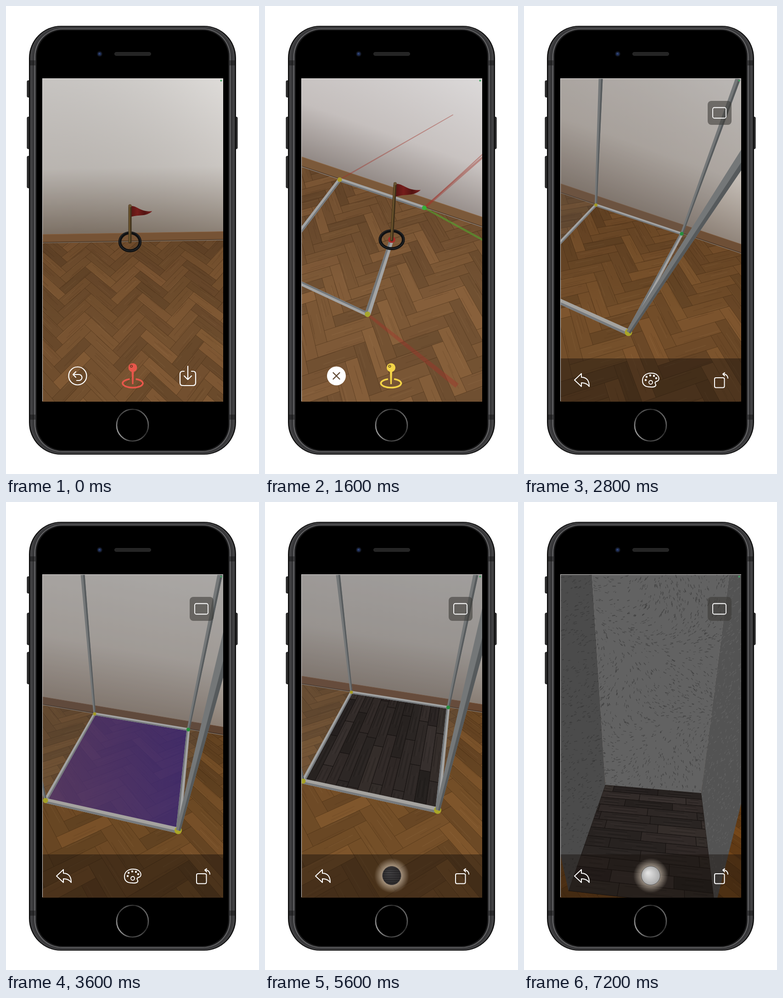
An HTML page with a canvas that plays this animation: 551 px wide and 1016 px high, repeating every 7.8 s.

```html
<!DOCTYPE html>
<html lang="en">
<head>
<meta charset="utf-8">
<title>Room scanner</title>
<style>
html, body { margin: 0; width: 100%; height: 100%; overflow: hidden; background: #fff; }
canvas { display: block; }
</style>
</head>
<body>
<canvas id="stage" width="551" height="1016"></canvas>
<script>
const c = document.getElementById('stage').getContext('2d');
const L = 79, T = 158, R = 473, B = 859;

// Camera poses. box: back-left, back-right, front-right, front-left on the floor.
// posts: x of the two back posts at the top, y of the front post at the right edge.
// flag: pole top, pole foot, ring radii. tilt: light from the right (1) or left (-1).
const poses = [
  { t: 0, box: [85, 515, 270, 512, 290, 745, 60, 750], posts: [167, 466, 335], flag: [270, 434, 270, 512, 22, 19.5],
    board: 19, tilt: 1, wood: '73502f', wall: ['d9d6d3', 'c9c4bf', '84776a'], skirt: '765335' },
  { t: 800, box: [248, 323, 461, 325, 510, 600, 238, 600], posts: [167, 466, 335], flag: [276, 404, 276, 508, 26, 22],
    board: 20, tilt: -1, wood: '816244', wall: ['c3c6d1', 'b6b8c2', 'a2a2a9'], skirt: '74543b' },
  { t: 2000, box: [120, 404, 290, 495, 80, 704, -99, 558], posts: [167, 466, 335], flag: [287, 377, 276, 507, 25, 18],
    board: 23, tilt: 1, wood: '77512e', wall: ['e4ded9', 'd3c9c0', '8d8076'], skirt: '7e5b3a' },
  { t: 3600, box: [193, 460, 397, 494, 375, 713, 86, 648], posts: [167, 466, 335], flag: [287, 377, 276, 507, 25, 18],
    board: 18, tilt: 0, wood: '6b4824', wall: ['c0bebb', 'b2aca6', '8a7d72'], skirt: '5e4331' },
  { t: 4400, box: [193, 410, 404, 444, 380, 667, 88, 602], posts: [167, 466, 310], flag: [287, 377, 276, 507, 25, 18],
    board: 18, tilt: 0, wood: '795328', wall: ['bbb9b7', 'b0aba7', '8e837a'], skirt: '6b4a35' },
  { t: 5600, box: [188, 413, 399, 446, 376, 669, 83, 606], posts: [159, 459, 285], flag: [287, 377, 276, 507, 25, 18],
    board: 18, tilt: 0, wood: '724d27', wall: ['b3b1af', 'a8a39e', '877c73'], skirt: '664631' },
  { t: 7200, box: [177, 614, 386, 632, 416, 880, 97, 844], posts: [148, 447, 655], flag: [287, 377, 276, 507, 25, 18],
    board: 18, tilt: 0, wood: '6e4318', wall: ['b3b1af', 'a8a39e', '877c73'], skirt: '664631' }
];

const hash = (a, b) => { const s = Math.sin(a * 12.9898 + b * 78.233) * 43758.5453; return s - Math.floor(s); };
const mix = (a, b, k) => a + (b - a) * k;
const mixAll = (a, b, k) => a.map((v, i) => mix(v, b[i], k));
const rgb = hex => [0, 2, 4].map(i => parseInt(hex.substr(i, 2), 16));
const css = (col, k = 1) => `rgb(${col.map(v => Math.round(v * k))})`;

function poseAt(t) {
  let i = 0;
  while (i < poses.length - 2 && poses[i + 1].t <= t) i++;
  const a = poses[i], b = poses[i + 1], k = Math.min(1, (t - a.t) / (b.t - a.t));
  const col = (x, y) => mixAll(rgb(x), rgb(y), k);
  return {
    box: mixAll(a.box, b.box, k), posts: mixAll(a.posts, b.posts, k), flag: mixAll(a.flag, b.flag, k),
    board: mix(a.board, b.board, k), tilt: mix(a.tilt, b.tilt, k),
    wood: col(a.wood, b.wood), skirt: col(a.skirt, b.skirt), wall: a.wall.map((w, j) => col(w, b.wall[j]))
  };
}

// Perspective map from the unit square to the four box corners.
function projector([x0, y0, x1, y1, x2, y2, x3, y3]) {
  const dx1 = x1 - x2, dx2 = x3 - x2, sx = x0 - x1 + x2 - x3;
  const dy1 = y1 - y2, dy2 = y3 - y2, sy = y0 - y1 + y2 - y3;
  const d = dx1 * dy2 - dx2 * dy1;
  const g = (sx * dy2 - dx2 * sy) / d, h = (dx1 * sy - sx * dy1) / d;
  return (u, v) => {
    const w = g * u + h * v + 1;
    return w < 0.08 ? null : [
      ((x1 - x0 + g * x1) * u + (x3 - x0 + h * x3) * v + x0) / w,
      ((y1 - y0 + g * y1) * u + (y3 - y0 + h * y3) * v + y0) / w];
  };
}

function trace(pts) {
  c.beginPath();
  pts.forEach(p => c.lineTo(p[0], p[1]));
  c.closePath();
}
function poly(pts, fill) { trace(pts); c.fillStyle = fill; c.fill(); }
function line(a, b, color, width = 1) {
  c.beginPath(); c.moveTo(a[0], a[1]); c.lineTo(b[0], b[1]);
  c.strokeStyle = color; c.lineWidth = width; c.stroke();
}
function oval(x, y, rx, ry, fill, stroke, width) {
  c.beginPath(); c.ellipse(x, y, rx, ry, 0, 0, 7);
  if (fill) { c.fillStyle = fill; c.fill(); }
  if (stroke) { c.strokeStyle = stroke; c.lineWidth = width; c.stroke(); }
}
function rounded(x, y, w, h, r, fill, stroke, width) {
  c.beginPath(); c.roundRect(x, y, w, h, r);
  if (fill) { c.fillStyle = fill; c.fill(); }
  if (stroke) { c.strokeStyle = stroke; c.lineWidth = width; c.stroke(); }
}
function icon(d, color = '#fff', width = 2.2) {
  c.strokeStyle = color; c.lineWidth = width; c.stroke(new Path2D(d));
}
function blend(x0, y0, x1, y1, colors, stops) {
  const g = c.createLinearGradient(x0, y0, x1, y1);
  colors.forEach((s, i) => g.addColorStop(stops ? stops[i] : i / (colors.length - 1), s));
  return g;
}
// Tapered strip from a to b; lo and hi choose the part of its width.
function strip(a, b, wa, wb, fill, lo = -0.5, hi = 0.5) {
  const dx = b[0] - a[0], dy = b[1] - a[1], n = Math.hypot(dx, dy) || 1;
  const at = (p, k) => [p[0] - dy / n * k, p[1] + dx / n * k];
  poly([at(a, wa * lo), at(b, wb * lo), at(b, wb * hi), at(a, wa * hi)], fill);
}
function tube(a, b, wa, wb = wa, light = '#a3a4a4', dark = '#73777a') {
  strip(a, b, wa, wb, light);
  strip(a, b, wa, wb, dark, 0.1, 0.5);
}

function parquet(map, wood) {
  const n = 4, across = 0.068, deep = 0.053;
  for (let m = -8; m < 10; m++) for (let k = -n * m - 6; k < 44 - n * m; k++) for (let up = 0; up < 2; up++) {
    const x = k + 2 * n * m, y = up ? k - 2 * n + 1 : k;
    const at = (i, j) => {
      const a = x + (up ? j : i), b = y + (up ? i : j);
      return map((a - b) * across, (a + b) * deep);
    };
    const pts = [at(0, 0), at(n, 0), at(n, 1), at(0, 1)];
    if (pts.includes(null)) continue;
    const xs = pts.map(p => p[0]), ys = pts.map(p => p[1]);
    if (Math.max(...xs) < L || Math.min(...xs) > R || Math.max(...ys) < T || Math.min(...ys) > B) continue;
    poly(pts, css(wood, 0.89 + 0.23 * hash(x + up * 31, y)));
    c.strokeStyle = 'rgba(40,22,8,.26)'; c.lineWidth = 0.9; c.stroke();
    for (let g = 1; g < 4; g++) {
      const j = hash(x + g, y + up * 9), i = hash(y, x + g) * 2;
      line(at(i, j), at(i + 1.8, j), g % 2 ? 'rgba(40,20,5,.1)' : 'rgba(255,220,170,.06)', 1.3);
    }
  }
}

function darkPlanks(map, turned) {
  const at = (a, b) => turned ? map(b, a) : map(a, b);
  const rows = 12;
  for (let r = 0; r < rows; r++) for (let i = -1; i < 3; i++) {
    const from = Math.max(0, i * 0.46 + hash(r, 4) * 0.46), to = Math.min(1, (i + 1) * 0.46 + hash(r, 4) * 0.46);
    if (to <= from) continue;
    const v0 = r / rows, v1 = (r + 1) / rows, k = 0.8 + 0.42 * hash(r, i);
    poly([at(from, v0), at(to, v0), at(to, v1), at(from, v1)], css([45, 39, 37], k));
    c.strokeStyle = '#161211'; c.lineWidth = 1; c.stroke();
    for (let g = 1; g < 5; g++) {
      const v = mix(v0, v1, g / 5), u = mix(from, to, hash(r + g, i) * 0.5);
      line(at(u, v), at(mix(u, to, 0.7), v), g % 2 ? 'rgba(0,0,0,.25)' : 'rgba(120,105,98,.13)');
    }
  }
}

function plaster(pts, fill, mark, count, angle) {
  c.save();
  poly(pts, fill); c.clip();
  const xs = pts.map(p => p[0]), x0 = Math.min(...xs), x1 = Math.max(...xs);
  c.lineCap = 'round';
  for (let i = 1; i <= count; i++) {
    const x = mix(x0, x1, hash(i, 1)), y = mix(T, B, hash(i, 2));
    const a = angle(x, y) + hash(i, 3) * 0.8, len = 1 + 5 * hash(i, 5) * (1.3 - (y - T) / 900);
    line([x, y], [x + len * Math.cos(a), y + len * Math.sin(a)], mark, 0.8 + hash(i, 6) * 1.2);
  }
  c.restore();
}

function flag([tx, ty, bx, by, rx, ry]) {
  oval(bx, by, rx, ry, null, '#0f1011', 6.5);
  oval(bx, by - 1, rx + 1, ry + 1, null, '#2b2e32', 1.2);
  const w = rx * 2.2, h = w / 2;
  c.beginPath();
  c.moveTo(tx + 2, ty);
  c.bezierCurveTo(tx + w * 0.35, ty, tx + w * 0.45, ty + h * 0.55, tx + w, ty + h * 0.48);
  c.bezierCurveTo(tx + w * 0.7, ty + h, tx + w * 0.45, ty + h * 0.75, tx + 1, ty + h);
  c.fillStyle = blend(tx, 0, tx + w, 0, ['#541412', '#761d1b', '#521311', '#7c2220']);
  c.fill();
  c.lineCap = 'round';
  line([tx, ty], [bx, by], '#3f301a', 7);
  line([tx - 1, ty], [bx - 1, by], '#6b532b', 3);
  oval(tx, ty, 3.5, 3, '#6a5535');
  c.lineCap = 'butt';
}

function joystick(x, color) {
  oval(x, 785, 9.5, 9.5, color);
  oval(x - 3, 782, 2.3, 2.3, null, 'rgba(70,45,25,.75)', 1.6);
  strip([x, 793], [x, 821], 5, 3, color);
  c.beginPath(); c.ellipse(x, 819, 22, 9.5, 0, -1.2, 4.34);
  c.strokeStyle = color; c.lineWidth = 3.6; c.stroke();
}

function scanControls(t) {
  c.lineCap = c.lineJoin = 'round';
  if (t < 400) {
    oval(156, 803, 19.5, 19.5, null, '#fff', 2.2);
    icon('M152 794L146 800L152 806M146 800H159A6.5 6.5 0 0 1 159 813H154');
    icon('M388 793H385Q379 793 379 799V818Q379 824 385 824H407Q413 824 413 818V799Q413 793 407 793H404M396 782V810M388 803L396 811L404 803');
  } else {
    oval(155.5, 803, 20.5, 20.5, '#fff');
    icon('M148.5 796L162.5 810M162.5 796L148.5 810', '#604832', 2.4);
  }
  joystick(t < 400 ? 276 : 274.5, t < 800 ? '#e7574a' : t < 2000 ? '#f4d548' : '#3c83f3');
}

function editControls(t) {
  c.fillStyle = 'rgba(24,17,12,.45)'; c.fillRect(L, 765, R - L, B - 765);
  rounded(400, 206, 52, 52, 8, 'rgba(60,57,54,.58)');
  rounded(411, 220.5, 29, 23, 3.5, null, '#fff', 1.8);
  c.lineCap = c.lineJoin = 'round';
  icon('M110 812L125 798V806C136 806 142 813 142 826C138 820 133 818 125 818V826Z', '#fff', 2);
  icon('M418 807H433Q436.5 807 436.5 810V825Q436.5 828.5 433 828.5H418Q415 828.5 415 825V810Q415 807 418 807ZM434 799Q443 799 444 808M437 796L433 799L437 803', '#fff', 2);
  if (t < 4400) {
    icon('M277 797C263 797 258 806 258 813C258 822 264 827 275 827C286 828 289 824 286 820C284 816 288 815 291 814C297 811 294 797 277 797Z', '#fff', 2);
    [[265, 812], [267, 805], [275, 802], [283, 803], [288, 808]].forEach(([x, y]) => oval(x, y, 2.2, 2.2, '#fff'));
    oval(276, 817, 4, 4, null, '#fff', 1.8);
    return;
  }
  const silver = t >= 6400;
  const glow = c.createRadialGradient(276, 811, 19, 276, 811, 38);
  glow.addColorStop(0, 'rgba(255,240,220,.55)'); glow.addColorStop(1, 'rgba(255,240,220,0)');
  oval(276, 811, 38, 38, glow);
  const disc = c.createRadialGradient(270, 805, 2, 276, 811, 22);
  disc.addColorStop(0, silver ? '#e2e2e2' : '#414042'); disc.addColorStop(1, silver ? '#a6a6a6' : '#2a2829');
  oval(276, 811, 20.5, 20.5, disc, silver ? '#555' : '#75695f', 1);
  if (silver) return;
  for (let y = 797; y < 829; y += 5) {
    const half = Math.sqrt(390 - (y - 811) ** 2);
    line([276 - half, y], [276 + half, y], '#1c1b1c');
  }
}

function scene(t) {
  const p = poseAt(t), map = projector(p.box);
  const [bl, br, fr, fl] = [0, 2, 4, 6].map(i => p.box.slice(i, i + 2));
  const slope = (br[1] - bl[1]) / (br[0] - bl[0]);
  const base = (x, up = 0) => [x, bl[1] + (x - bl[0]) * slope - up];
  const cursor = [p.flag[2], p.flag[3]];
  const rel = (a, x, y) => [a[0] + x, a[1] + y];

  c.fillStyle = css(p.wood); c.fillRect(L, T, R - L, B - T);
  parquet(map, p.wood);
  const mid = base(276), tall = mid[1] - 130;
  c.fillStyle = blend(0, mid[1], 0, mid[1] + 190, ['rgba(50,28,12,.18)', 'rgba(50,28,12,0)']);
  c.fillRect(L, T, R - L, B - T);

  const wall = [[L, T - 80], [R, T - 80], base(R), base(L)];
  poly(wall, blend(mid[0] + slope * tall, mid[1] - tall, mid[0], mid[1] - 15, p.wall.map(w => css(w)), [0, 0.6, 1]));
  const lean = 197 * Math.sign(p.tilt);
  c.globalAlpha = Math.abs(p.tilt);
  poly(wall, blend(276 - lean, T + 170, 276 + lean, T, ['rgba(0,0,0,.08)', 'rgba(255,255,255,.18)']));
  c.globalAlpha = 1;
  poly([base(L, p.board), base(R, p.board), base(R, 2), base(L, 2)], css(p.skirt));
  line(base(L, p.board), base(R, p.board), css(p.skirt, 1.15));
  line(base(L, 2), base(R, 2), css(p.skirt, 0.65), 1.5);

  if (t >= 2800) {
    const blTop = [p.posts[0], T], brTop = [p.posts[1], T], frEdge = [R, p.posts[2]];
    const left = [[L, T], blTop, bl, fl, rel(fl, -18, -79), [L, Math.min(fl[1], 765)]];
    const back = [blTop, brTop, br, bl];
    const right = [brTop, [R, T], frEdge, fr, br];
    if (t >= 4400) darkPlanks(map, t >= 5200 && t < 6000);
    else if (t >= 3200) poly([bl, br, fr, fl], blend(fl[0], 0, br[0], 0, ['rgba(80,52,116,.74)', 'rgba(54,36,128,.74)']));
    if (t >= 6400) {
      plaster(left, '#4b4b4b', 'rgba(35,35,35,.3)', 700, () => 2.3);
      plaster(back, '#626262', 'rgba(48,48,48,.45)', 2300, (x, y) => Math.sin(x / 75) + Math.cos(y / 62) * 1.2);
      plaster(right, '#535353', 'rgba(110,110,110,.4)', 900, (x, y) => 2 - (y - T) / 1400);
    } else {
      [left, back, right].forEach(w => poly(w, 'rgba(100,98,95,.24)'));
    }
  }

  if (t >= 400 && t < 2400) guides();
  if (t >= 2400 && t < 6400) frame();
  if (t < 2400) flag(p.flag);

  function guides() {
    const red = 'rgba(160,50,42,.42)', green = 'rgba(82,165,45,.6)';
    if (t >= 800 && t < 1600) {
      strip(rel(bl, 5, -165), rel(bl, -15, 536), 3, 8, red);
      strip(rel(br, -40, -167), rel(br, 12, 37), 3, 4, red);
      strip(rel(cursor, -197, 23), rel(cursor, 197, -22), 5, 5, green);
      strip(rel(cursor, 3, 10), rel(cursor, 44, 292), 4, 8, green);
    }
    if (t >= 1600) {
      strip(bl, rel(bl, 247, -141), 3, 1.6, red);
      strip(br, rel(br, 183, -168), 3, 2, red);
      strip(br, rel(br, 142, -123), 6, 4, red);
      strip(fr, rel(fr, 195, 155), 6, 11, red);
      strip(br, rel(br, 183, 100), 4, 5, green);
    }
    // Each side runs to the cursor until its end point is placed.
    if (t < 800) tube(cursor, br, 6);
    else tube(bl, br, 8);
    if (t >= 800) tube(t < 1200 ? cursor : fl, bl, 9, 8);
    if (t >= 1200) tube(t < 1600 ? cursor : fr, fl, 9);
    if (t >= 1600) tube(t < 2000 ? cursor : br, fr, 9, 13);
    oval(...bl, 5, 5, '#a99b2a');
    oval(...br, 5, 5, t < 2000 ? '#36b038' : '#b33a35');
    if (t >= 1200) oval(...fl, 6, 6, '#a7a62d');
    if (t >= 1600) oval(...fr, 6, 6, '#a7a62d');
    if (t >= 800 && t < 2000) oval(...cursor, 8, 7, '#a72b28');
  }

  function frame() {
    const grow = Math.min(1, (t - 2000) / 800);
    const post = (a, b, wa, wb) => tube(a, mixAll(a, b, grow), wa, mix(wa, wb, grow), '#747778', '#565a5c');
    post(bl, [p.posts[0], T], 5, 9);
    post(br, [p.posts[1], T], 6, 11);
    tube(bl, br, 6);
    tube(br, fr, 7, 10);
    tube(fl, bl, 8, 6);
    tube(fl, fr, 11, 13, '#a5a39f', '#777a7d');
    post(fl, rel(fl, -18, -79), 6, 8);
    oval(...bl, 3.5, 3.5, '#a39b25');
    oval(...br, 4, 4, '#278e3c');
    oval(...fl, 5.5, 5.5, '#a5a226');
    oval(...fr, 8, 8, '#aaa629');
    post(fr, [mix(fr[0], R, 1.3), mix(fr[1], p.posts[2], 1.3)], 10, 29);
  }
}

function phone() {
  c.fillStyle = '#fff'; c.fillRect(0, 0, 551, 1016);
  [[46, 162, 36], [46, 241, 69], [46, 326, 69], [496, 241, 69]].forEach(([x, y, h]) => rounded(x, y, 8, h, 2, '#2d2d2e', '#0c0c0c', 1));
  rounded(50, 43, 451, 931, 70, '#0d0d0d');
  rounded(52.5, 44.5, 446, 928, 68, '#414143');
  rounded(57, 46, 437, 925, 65, '#38383a');
  rounded(62, 49, 427, 919, 61, '#6c6c6e');
  rounded(64, 50.5, 423, 916, 59, '#1c1c1d');
  rounded(67, 53, 417, 911, 56, '#000');
  c.fillStyle = 'rgba(0,0,0,.35)';
  [118, 887].forEach(y => [52, 487].forEach(x => c.fillRect(x, y, 12, 11)));
  oval(204, 104, 6, 6, '#10131b');
  oval(204, 104, 3.8, 3.8, '#1f2f57');
  oval(203.5, 103.5, 1.3, 1.3, '#40568a');
  rounded(236.5, 100.5, 79, 7, 3.5, '#242424', '#2c2c2c', 1);
  oval(275.5, 910, 34.5, 34.5, '#000', blend(242, 925, 309, 892, ['#a2a2a2', '#3a3a3a', '#555', '#282828', '#777']), 2.6);
}

function draw(t) {
  c.lineCap = 'butt'; c.lineJoin = 'miter';
  phone();
  c.save();
  c.beginPath(); c.rect(L, T, R - L, B - T); c.clip();
  scene(t);
  if (t < 2800) scanControls(t); else editControls(t);
  oval(468.5, 162, 2, 2, '#44a765');
  c.restore();
  line([79.5, 157.5], [79.5, 858], '#d8d5d4');
  line([79, 157.5], [473, 157.5], '#d8d5d4');
}

const start = performance.now();
let shown = -1;
function tick() {
  const step = Math.min(18, Math.floor((performance.now() - start) % 7800 / 400));
  if (step !== shown) draw((shown = step) * 400);
  requestAnimationFrame(tick);
}
tick();
</script>
</body>
</html>
```
